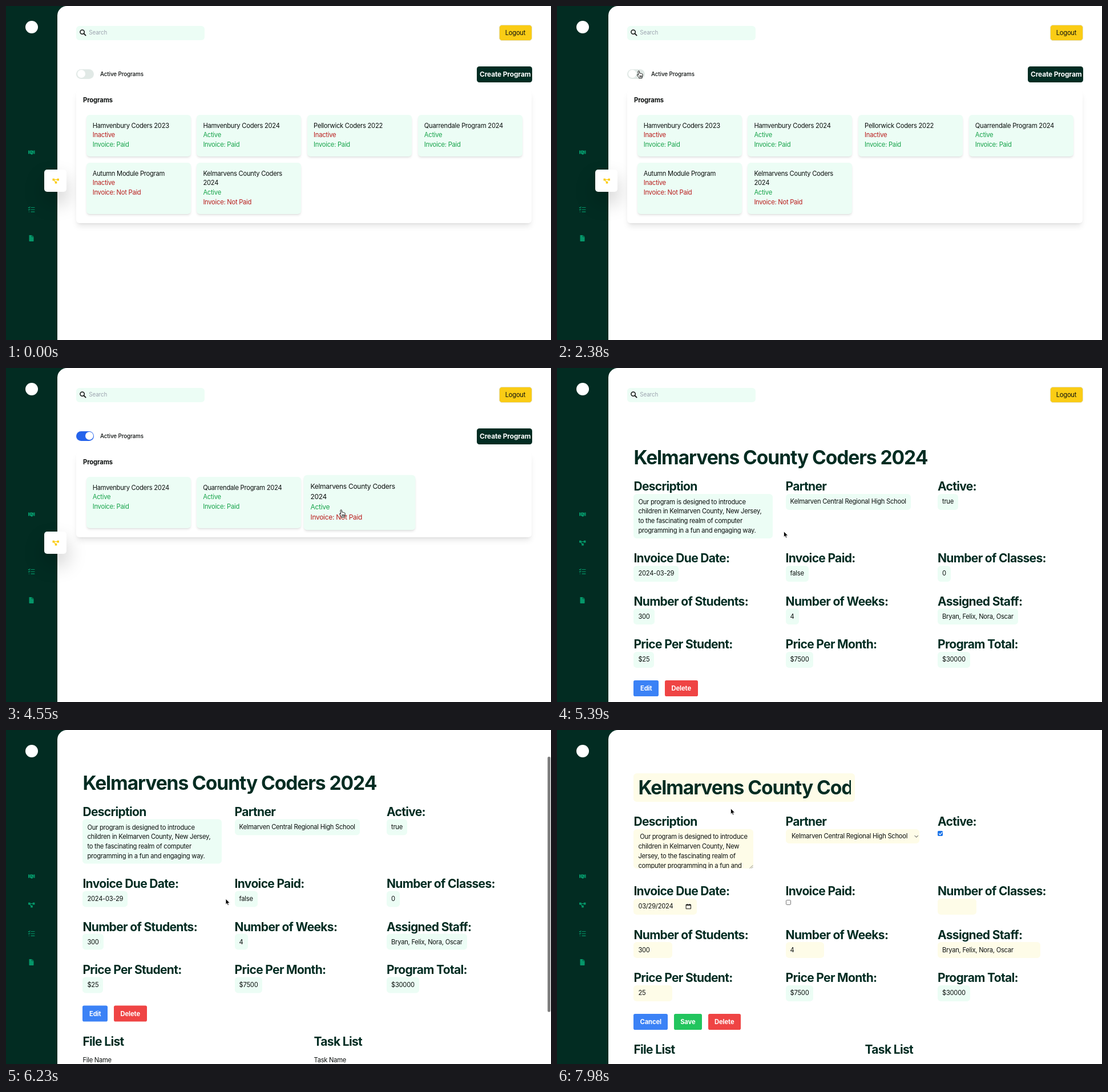
An HTML page that plays this animation: 955x586 px, repeating every 8000 ms.

```html
<!DOCTYPE html>
<html lang="en">
<head>
<meta charset="utf-8">
<title>Program dashboard</title>
<style>
  html, body { margin: 0; width: 100%; height: 100%; overflow: hidden; background: #022c22; }
  body { position: relative; font-family: Inter, "Liberation Sans", sans-serif; font-optical-sizing: none; }
  div { position: absolute; box-sizing: border-box; white-space: pre; }
  svg { position: absolute; overflow: visible; }
  #stage { inset: 0; overflow: clip; contain: strict; }
  .panel { background: #fff; border-radius: 5.6px;
    box-shadow: 0 7px 10.5px -2.1px #0000001a, 0 2.8px 4.2px -2.8px #0000001a; }
  .card { background: #ecfdf5; border-radius: 5.6px; padding: 10.6px 11.2px; color: #0b0f0e;
    font-size: 11.2px; line-height: 16.8px; letter-spacing: -.023em;
    box-shadow: 0 2.8px 4.2px -.7px #0000001a, 0 1.4px 2.8px -1.4px #0000001a; }
  .value { background: #ecfdf5; border-radius: 5.6px; padding: 5.5px 8px; color: #0b0f0e;
    font-size: 11.2px; line-height: 16.8px; letter-spacing: -.023em; overflow: hidden; }
  .input { background: #fefce8; }
  .button { border-radius: 2.8px; color: #fff; text-align: center;
    font-size: 11.2px; line-height: 28px; font-weight: 700; letter-spacing: -.01em; }
</style>
</head>
<body>
<script>
const DARK = '#022c22', MINT = '#ecfdf5', BLUE = '#3b82f6', BLUE_HOVER = '#1d4ed8', RED = '#ef4444';
const COLS = [134.4, 400.6, 667];
const PROGRAM = 'Kelmarvens County Coders 2024';
const SCHOOL = 'Kelmarven Central Regional High School';
const STAFF = 'Bryan, Felix, Nora, Oscar';

const px = v => v === 'auto' ? v : v + 'px';
const box = (x, y, w, h, css = '', html = '', attrs = '') =>
  `<div ${attrs} style="left:${x}px;top:${y}px;width:${px(w)};height:${px(h)};${css}">${html}</div>`;
const tracking = (size, weight) => size > 20 ? -.032 : size < 10 || weight > 500 ? -.01 : -.023;
const text = (x, yMid, s, size = 11.2, weight = 400, color = '#0b0f0e') =>
  box(x, yMid - size, 'auto', 'auto', `font-size:${size}px;line-height:${2 * size}px;font-weight:${weight};` +
    `color:${color};letter-spacing:${tracking(size, weight)}em`, s);
const heading = (x, y, s) => text(x, y, s, 21, 700, DARK);
const value = (x, yMid, s, w = 'auto', kind = '', h = 27.8) =>
  box(x, yMid - 13.9, w, h, '', s, `class="value ${kind}"`);
const button = (x, y, w, s, color, id = '') =>
  box(x, y, w, 28, `background:${color}`, s, `class="button" id="${id}"`);
const svg = (x, y, body, attrs = '') =>
  `<svg ${attrs} width="12" height="12" style="left:${x}px;top:${y}px" fill="none" stroke-linecap="round" stroke-linejoin="round">${body}</svg>`;
const group = (id, html) => `<div id="${id}">${html}</div>`;

const header = () =>
  box(123.2, 35, 224.8, 25, `background:${MINT};border-radius:5.6px`) +
  svg(128.5, 41, '<circle cx="4.6" cy="4.6" r="3.7" stroke="#111" stroke-width="1.5"/><path d="M7.4 7.4L10.6 10.6" stroke="#111" stroke-width="1.8"/>') +
  text(145.3, 47, 'Search', 9.8, 400, '#9ca3af') +
  box(864, 33, 57.5, 28, 'background:#facc15;border:.7px solid #e5e0c0;border-radius:5px') +
  text(874.8, 47, 'Logout');

// Sidebar
const icons = {
  hands: '<path fill="#059669" d="M0 1.5H2V7.5H0ZM9.5 1.5H11.5V7.5H9.5ZM2.5 2L5 1.2 6 1.6 9 2V7L6.2 9 2.5 6.8Z"/><path d="M5.8 3L4.3 4.3 6 4.6 8.4 6.6" stroke="#022c22" stroke-width=".6"/>',
  tree: '<path fill="currentColor" d="M0 .8H3.6V4.4H0ZM7.8 .8H11.4V4.4H7.8ZM4.2 5.8H7.8V9.4H4.2Z"/><path d="M3 2.6H8M2.6 3.6L5.4 7" stroke="currentColor" stroke-width="1.2"/>',
  tasks: '<path stroke="#059669" stroke-width="1.1" d="M.3 1.5L1.2 2.4 3 .5M.3 5.2L1.2 6.1 3 4.2M1.3 9.1H1.5M5 1.5H11M5 5.2H11M5 9.1H11"/>',
  file: '<path fill="#059669" d="M.5 0H5V3.3H8.5V10.3Q8.5 11 7.8 11H1.2Q.5 11 .5 10.3ZM5.7 0L8.5 2.7H5.7Z"/>'
};

// Program list
const programs = [
  ['Hamvenbury Coders 2023', 0, 1],
  ['Hamvenbury Coders 2024', 1, 1],
  ['Pellorwick Coders 2022', 0, 1],
  ['Quarrendale Program 2024', 1, 1],
  ['Autumn Module Program', 0, 0],
  [PROGRAM.replace(' 2024', '\n2024'), 1, 0]
];
const tint = (good, s) => `<span style="color:${good ? '#16a34a' : '#b91c1c'}">${s}</span>`;
const card = ([name, active, paid], col, y, h) => box(140.5 + 193.7 * col, y, 183.2, h, '',
  `${name}\n${tint(active, active ? 'Active' : 'Inactive')}\n${tint(paid, 'Invoice: ' + (paid ? 'Paid' : 'Not Paid'))}`,
  'class="card"');

const list = header() +
  box(123.2, 111, 30.8, 16.8, 'border-radius:9px', '', 'id="track"') +
  box(124.6, 112.4, 14, 14, 'background:#fff;border-radius:50%', '', 'id="knob"') +
  text(165, 119.5, 'Active Programs', 9.8, 500) +
  box(824.5, 106, 97, 27.5, `background:${DARK};border-radius:4.5px`) +
  text(830, 120, 'Create Program', 11.9, 700, '#fff') +
  box(123.2, 148, 798.3, 233, '', '', 'class="panel" id="panel"') +
  text(135, 165.3, 'Programs', 11.2, 700) +
  group('all', programs.map((p, i) => card(p, i % 4, i < 4 ? 191 : 275, i < 4 ? 73 : 89.5)).join('')) +
  group('some', programs.filter(p => p[1]).map((p, i) => card(p, i, 191, 89.5)).join(''));

// Program details
const labels = ['Description', 'Partner', 'Active:', 'Invoice Due Date:', 'Invoice Paid:', 'Number of Classes:',
  'Number of Students:', 'Number of Weeks:', 'Assigned Staff:', 'Price Per Student:', 'Price Per Month:', 'Program Total:'];
const headings = rows => labels.map((s, i) => heading(COLS[i % 3], rows[i / 3 | 0], s)).join('');
const values = [, SCHOOL, 'true', '2024-03-29', 'false', '0', '300', '4', STAFF, '$25', '$7500', '$30000'];
const rows = [208, 334, 409.5, 485];
const lists = y => heading(COLS[0], y, 'File List') + heading(539.5, y, 'Task List') +
  text(COLS[0], y + 32, 'File Name') + text(539.5, y + 32, 'Task Name');

const detail = header() + text(COLS[0], 157, PROGRAM, 33.6, 700, DARK) + headings(rows) +
  values.map((s, i) => value(COLS[i % 3], rows[i / 3 | 0] + 26.7, s)).join('') +
  value(COLS[0], 234.9, 'Our program is designed to introduce\nchildren in Kelmarven County, New Jersey,\n' +
    'to the fascinating realm of computer\nprogramming in a fun and engaging way.', 244, '', 78) +
  button(COLS[0], 547.8, 43.7, 'Edit', BLUE, 'edit') + button(189, 547.8, 57.5, 'Delete', RED) + lists(611);

// Edit form
const form = box(COLS[0], 75.5, 388, 50.5, 'background:#fefce8;border-radius:5.6px') +
  box(142.5, 75.5, 372.5, 50.5, 'overflow:hidden', text(0, 25.5, PROGRAM, 33.6, 700, DARK)) +
  headings([161, 283, 359.5, 435]) +
  value(COLS[0], 187.7, ' Our program is designed to introduce\nchildren in Kelmarven County, New\n' +
    'Jersey, to the fascinating realm of\ncomputer programming in a fun and', 210, 'input', 69.3) +
  svg(338, 237, '<path d="M0 5.5L5 .5M3 5.5L5 3.5" stroke="#555" stroke-width=".7"/>') +
  box(COLS[1], 174, 234.5, 25, 'background:#fefce8;border-radius:5.6px') + text(411, 186.5, SCHOOL) +
  svg(627, 185, '<path d="M0 .5L2.7 3.2 5.4 .5" stroke="#222" stroke-width=".9"/>') +
  box(667, 176.8, 9, 9, 'background:#1a73e8;border-radius:1.8px') +
  svg(668.5, 178.5, '<path d="M.5 3L2.3 4.8 5.6 .8" stroke="#fff" stroke-width="1.3"/>') +
  value(COLS[0], 309.8, '03/29/2024', 110.6, 'input') +
  svg(225.5, 305, '<path d="M.5 1.5H8.5V8.7H.5ZM.5 2.4H8.5M2.2 .3V1.5M6.8 .3V1.5" stroke="#111" stroke-width="1"/>') +
  box(400.6, 298, 9, 9, 'background:#fff;border:.8px solid #767676;border-radius:1.8px') +
  value(COLS[2], 309.8, '', 68, 'input') +
  value(COLS[0], 386.2, '300', 68, 'input') + value(COLS[1], 386.2, '4', 67.5, 'input') +
  value(COLS[2], 386.2, STAFF, 180, 'input') +
  value(COLS[0], 461.8, '25', 68, 'input') + value(COLS[1], 461.8, '$7500') + value(COLS[2], 461.8, '$30000') +
  button(COLS[0], 497.7, 59.6, 'Cancel', BLUE, 'cancel') + button(205, 497.7, 48.7, 'Save', '#22c55e') +
  button(264.5, 497.7, 57.5, 'Delete', RED) + lists(561);

const cursorPaths =
  '<path id="arrow" d="M0 0V9.6L2.2 7.6 3.6 10.9 5.3 10.2 3.9 7H6.9Z" fill="#000" stroke="#fff" stroke-width=".7"/>' +
  '<path id="hand" d="M-1 1Q-1-.2 .2-.2 1.3-.2 1.4 1L1.6 4.2Q2.8 3.2 3.6 4.4 5 3.8 5.6 5.1 7.2 4.7 7.2 6.4 7.2 9 6 11V12.6H.6V11.4Q-1.2 9.6-2.6 7.4-2.6 5.8-1.4 6.3L-.6 7.2ZM2 8.2V10.5M3.6 8.2V10.5M5.2 8.2V10.5" fill="#fff" stroke="#000" stroke-width=".9"/>';

document.body.innerHTML = group('stage',
  box(33.5, 26, 22, 22, 'background:#fff;border-radius:50%') +
  svg(39, 251.5, icons.hands) + svg(39, 351.5, icons.tasks) + svg(40, 402, icons.file) +
  box(89.5, 0, 865.5, 586, 'background:#fff;border-radius:16.8px 0 0 0') +
  box(67, 287, 39, 39, 'background:#fff;border-radius:5px;box-shadow:0 17.5px 35px #00000038', '', 'id="tile"') +
  svg(39, 301.5, icons.tree, 'id="tree"') +
  group('list', list) + group('detail', detail) + group('form', form) +
  box(948.5, 0, 5.5, 448, 'background:#7f7f7f;border-radius:3px', '', 'id="bar"') +
  svg(0, 0, cursorPaths, 'id="cursor"'));

const $ = id => document.getElementById(id);
const show = (id, on) => { $(id).style.display = on ? '' : 'none'; };
const ramp = (t, a, b) => Math.min(1, Math.max(0, (t - a) / (b - a)));
const smooth = p => p * p * (3 - 2 * p);
const between = (t, a, b) => t >= a && t < b;
const hover = (t, a, b) => smooth(ramp(t, a - 70, a + 110)) * (1 - smooth(ramp(t, b - 70, b + 110)));

// Each key is [time, ...values]
function track(keys, t, ease = p => p) {
  const i = keys.findIndex(k => k[0] > t);
  if (i < 0) return keys[keys.length - 1].slice(1);
  if (!i) return keys[0].slice(1);
  const a = keys[i - 1], b = keys[i], p = ease(ramp(t, a[0], b[0]));
  return a.slice(1).map((v, j) => v + (b[j + 1] - v) * p);
}
const path = [[350, 464, 592], [1190, 163.5, 133], [1750, 144, 126], [2170, 144, 126], [2380, 143, 114],
  [2730, 143, 114], [3290, 405, 242], [3430, 405, 242], [3850, 587, 249], [4970, 587, 249], [5250, 440, 297],
  [5390, 397.5, 287], [6160, 397.5, 287], [6720, 108, 508], [7000, 143.5, 498], [7420, 143.5, 498], [7980, 304.5, 138]];
const scrolling = [[5600, 0], [5880, 45.5], [6020, 64.5]];
const cardHovers = [[3010, 3150], [3150, 3570], [3570, 4690]];

function render(t) {
  const on = t >= 2660, flip = smooth(ramp(t, 2590, 2740));
  show('list', t < 4690);
  show('detail', between(t, 4690, 7280));
  show('form', t >= 7280);
  show('all', !on);
  show('some', on);
  $('panel').style.height = (on ? 149 : 233) + 'px';
  $('track').style.background = on ? '#2563eb' : '#e1e9e6';
  $('track').style.boxShadow = between(t, 2660, 4550) ? '0 0 0 2.8px #93c5fd' : '';
  $('knob').style.transform = `translateX(${14 * flip}px)`;
  [...$('some').children].forEach((el, i) => {
    el.style.transform = `scale(${1 + .07 * hover(t, ...cardHovers[i])})`;
  });

  const away = smooth(ramp(t, 4620, 4830));
  $('tile').style.opacity = 1 - away;
  $('tile').style.transform = `translateX(${-42.5 * away}px)`;
  $('tree').style.transform = `translateX(${42.5 * (1 - away)}px)`;
  $('tree').style.color = away < .5 ? '#facc15' : '#059669';

  const [scroll] = track(scrolling, t);
  $('detail').style.transform = `translateY(${-scroll}px)`;
  $('bar').style.transform = `translateY(${scroll * .725}px)`;
  $('bar').style.opacity = t < 5670 ? 0 : 1 - ramp(t, 6500, 6720);

  for (const [id, a, b] of [['edit', 6790, 7280], ['cancel', 7280, 7490]]) {
    const over = between(t, a, b);
    $(id).style.background = over ? BLUE_HOVER : BLUE;
    $(id).style.transform = over ? 'scale(1.05)' : '';
  }

  const [x, y] = track(path, t, smooth);
  const hand = between(t, 2310, 2870) || between(t, 3010, 4690) || between(t, 6790, 7490);
  show('cursor', t >= 420);
  $('cursor').style.transform = `translate(${x}px,${y}px)`;
  show('hand', hand);
  show('arrow', !hand);
}

function frame() {
  render(Math.floor(performance.now() % 8000 / 70) * 70);
  requestAnimationFrame(frame);
}
frame();
</script>
</body>
</html>
```
